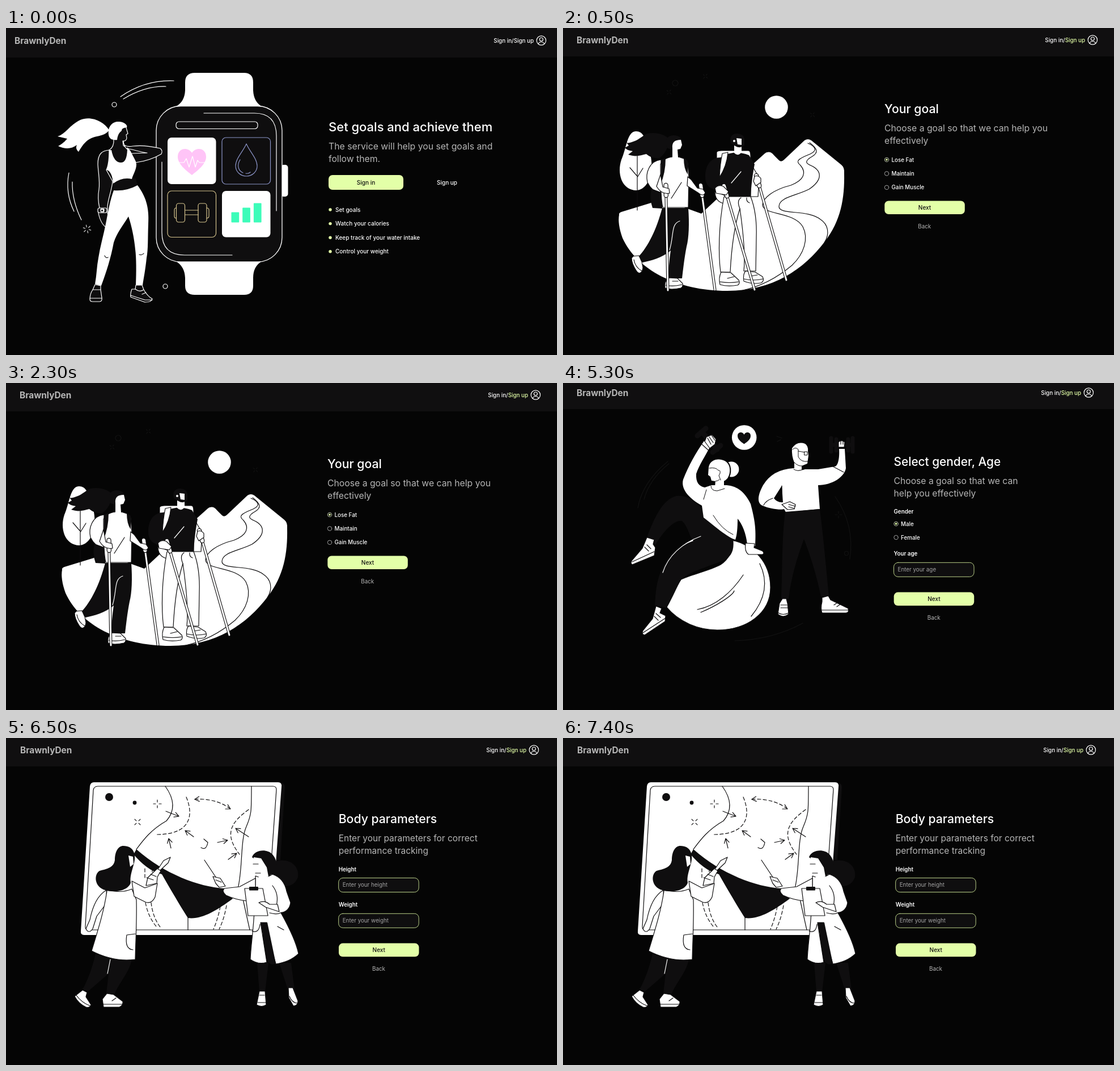
These frames come from a looping animation (972 by 576 pixels, 8000 ms). An HTML page with a canvas:

```html
<!DOCTYPE html>
<html lang="en">
<head>
<meta charset="utf-8">
<title>Health tracker onboarding</title>
<style>
html, body { margin: 0; width: 100%; height: 100%; overflow: hidden; background: #050505; }
canvas { display: block; width: 972px; height: 576px; }
</style>
</head>
<body>
<canvas id="stage" width="972" height="576"></canvas>
<script>
const ctx = document.getElementById('stage').getContext('2d');
const BACK = '#050505', WHITE = '#fff', INK = '#0f0e0f', LIME = '#e3ffa8', GREY = '#b6b6b6', FAINT = '#121212';
const STEPS = [500, 3500, 6500, 8000];

// Shape helpers
function shape(d, fill, stroke, width = 1.2) {
  const path = new Path2D(d);
  if (fill) { ctx.fillStyle = fill; ctx.fill(path); }
  if (stroke) { ctx.strokeStyle = stroke; ctx.lineWidth = width; ctx.stroke(path); }
}
const line = (d, color = INK, width = 1.2) => shape(d, null, color, width);
const outlined = d => shape(d, WHITE, INK);
const hollow = d => shape(d, INK, WHITE);

function paint(fill, stroke, width) {
  if (fill) { ctx.fillStyle = fill; ctx.fill(); }
  if (stroke) { ctx.strokeStyle = stroke; ctx.lineWidth = width; ctx.stroke(); }
}
function circle(x, y, r, fill, stroke, width = 1.2) {
  ctx.beginPath();
  ctx.arc(x, y, r, 0, Math.PI * 2);
  paint(fill, stroke, width);
}
function box(x, y, w, h, r, fill, stroke, width = 1.2) {
  ctx.beginPath();
  ctx.roundRect(x, y, w, h, r);
  paint(fill, stroke, width);
}
function dashed(d) {
  ctx.setLineDash([6, 4]);
  line(d);
  ctx.setLineDash([]);
}
function rays(x, y, inner, outer, count, turn, color) {
  for (let i = 0; i < count; i++) {
    const a = turn + i * Math.PI * 2 / count, c = Math.cos(a), s = Math.sin(a);
    line(`M${x + c * inner} ${y + s * inner}L${x + c * outer} ${y + s * outer}`, color);
  }
}
function arrow(x1, y1, x2, y2, shaft = true) {
  const a = Math.atan2(y2 - y1, x2 - x1);
  const barb = t => `${x2 - 9 * Math.cos(a + t)} ${y2 - 9 * Math.sin(a + t)}`;
  line(`M${barb(.5)}L${x2} ${y2}L${barb(-.5)}` + (shaft ? `M${x1} ${y1}L${x2} ${y2}` : ''));
}
function pole(x1, y1, x2, y2) {
  const d = `M${x1} ${y1}L${x2} ${y2}`, k = 18 / (y2 - y1);
  const grip = `M${x1} ${y1}L${x1 + (x2 - x1) * k} ${y1 + 18}`;
  line(d, INK, 5); line(d, WHITE, 2.8);
  line(grip, INK, 8.4); line(grip, WHITE, 6);
}

// Interface helpers
function text(str, x, y, size = 10, color = WHITE, weight = 500, align = 'left') {
  ctx.font = `${weight} ${size}px Inter, "Open Sans", sans-serif`;
  ctx.textAlign = align;
  ctx.fillStyle = color;
  ctx.fillText(str, x, y);
}
function header(height, x, base, right, accent) {
  ctx.fillStyle = '#100f10';
  ctx.fillRect(0, 0, 972, height);
  text('BrawnlyDen', x, base, 15.4, GREY, 700);
  text('Sign up', right, base - 2, 9.8, accent, 500, 'right');
  text('Sign in/', right - ctx.measureText('Sign up').width, base - 2, 9.8, WHITE, 500, 'right');
  const cx = right + 13.3, cy = base - 6;
  circle(cx, cy, 8.2, null, WHITE, 1.2);
  circle(cx, cy - 2, 3, null, WHITE, 1.2);
  line(`M${cx - 5.3} ${cy + 6}Q${cx - 4} ${cy + 2.5} ${cx} ${cy + 2.5}Q${cx + 4} ${cy + 2.5} ${cx + 5.3} ${cy + 6}`, WHITE);
}
function heading(title, lines, x, base, size, subSize) {
  text(title, x, base, size);
  lines.forEach((s, i) => text(s, x, base + 32.3 + i * 21.5, subSize, GREY, 400));
}
function radio(label, x, y, on) {
  circle(x, y, 3.7, null, on ? '#e6efd2' : '#c4c4c4', .8);
  if (on) circle(x, y, 1.8, LIME);
  text(label, x + 8.5, y + 3.5, 9.8);
}
function button(label, x, y, w, h) {
  box(x, y, w, h, 7, LIME);
  text(label, x + w / 2, y + h / 2 + 3.5, 10, INK, 500, 'center');
}
function nextBack(x, y) {
  button('Next', x, y, 141.5, 23.7);
  text('Back', x + 70.5, y + 48.3, 9.8, GREY, 400, 'center');
}
function field(label, hint, x, y) {
  text(label, x, y - 12, 9.8, WHITE, 600);
  box(x, y, 141.5, 25, 7.5, INK, '#b9cf88', 1);
  text(hint, x + 7, y + 15.4, 9.8, '#a5a5a5', 400);
}

function watch() {
  shape('M316 96Q316 79 333 79H420Q436 79 436 96V110Q437 130 451 138H300Q315 130 316 110Z', WHITE);
  shape('M300 411H451Q436 420 436 440V454Q436 470 420 470H333Q316 470 316 454V440Q315 420 300 411Z', WHITE);
  box(265, 137.5, 222, 274.5, 43, INK, WHITE, 1.3);
  box(487, 241, 10.5, 56, [2, 5, 5, 2], WHITE);
  line('M349 150H438Q477 150 477 190V322M275 236V360Q275 400 315 400H399', WHITE);
  box(300, 165, 144, 12.5, 5, null, WHITE);
  box(285, 193, 85.5, 82, 7, WHITE);
  box(381, 193, 85.5, 82, 7, null, '#8c95c9');
  box(285, 287, 85.5, 81.5, 7, null, '#d6c48e');
  box(381, 287, 85.5, 81.5, 7, WHITE);
  shape('M328 259C318 251 303 240 303 227C303 211 321 209 328 220C335 209 353 211 353 227C353 240 338 251 328 259Z', '#ffc4f7');
  line('M303 237H314L318 230 323 245 329 226 334 245 338 233 341 237H353', WHITE);
  line('M424 204C418 218 405 230 405 243A19 18 0 0 0 443 243C443 230 430 218 424 204ZM413 232C406 243 411 252 418 255M423 256Q428 257 431 254', '#8c95c9');
  for (const x of [300.5, 339]) box(x, 309, 15, 33, 4, null, '#d6c48e');
  line('M316 321H339M316 329H339M300 317Q297 317 297 321V331Q297 335 300 335M354 317Q358 317 358 321V331Q358 335 354 335', '#d6c48e');
  [18, 26, 34].forEach((h, i) => box(397.5 + i * 19.7, 342.5 - h, 13.7, h, 1, '#3dfcb9'));
}

function athlete() {
  line('M202 121Q245 91 296 93M207 125Q245 102 282 103M111 255Q104 290 120 323M117 271Q116 303 133 338', WHITE);
  circle(191, 135, 4, null, WHITE);
  circle(281, 455, 4, null, WHITE);
  rays(143, 354, 3.5, 7, 6, .3, '#ddd');
  shape('M182 180C173 165 150 154 131 162C112 171 105 187 91 191L108 195C101 203 96 206 92 208C105 214 116 213 125 206C122 212 126 216 128 218C136 205 142 196 156 192C167 189 175 189 182 180Z', WHITE);
  hollow('M190 195Q191 210 182 215L188 240H216L219 216 207 207 206 199Q212 200 213 194L212 188 215 186 211 172 195 176Z');
  shape('M181 188C179 172 189 164 200 165C210 166 215 172 213 175C206 176 204 178 204 181C200 184 197 188 196 197C187 198 182 195 181 188Z', WHITE);
  hollow('M207 199C206 207 212 210 224 208C240 206 255 208 272 212Q277 216 274 222C262 229 245 235 229 237L219 217Q208 212 207 199Z');
  line('M212 212C225 214 238 219 249 220L221 221', WHITE);
  shape('M189 274Q205 260 229 265L232 278Q212 289 190 288Z', INK);
  shape('M186 215Q190 237 203 237C212 237 214 224 214 210L219 216C222 224 229 232 230 240C230 250 224 258 222 266Q205 262 189 274C188 256 181 250 177 250C182 240 182 226 182 215Z', WHITE);
  hollow('M182 215C168 216 162 223 162 240C163 258 166 270 164 284Q161 300 165 317L163 326Q167 346 179 353C185 355 187 346 184 338L179 326V315C180 300 187 285 188 270L177 250C182 240 182 226 182 215Z');
  box(162, 317, 16, 8.5, 3, INK, WHITE);
  box(166.5, 318, 7, 6.5, 1.5, WHITE);
  circle(169.5, 321.3, 1.6, INK);
  shape('M190 286Q212 288 232 277C246 296 253 315 251 345C250 370 251 390 248 405C246 425 243 440 241 453H229C230 430 230 405 228 390C226 370 222 350 216 332C205 350 196 360 190 378C185 405 177 430 168 454L157 451C160 435 160 420 163 405C166 385 172 365 176 345C180 325 183 305 190 286Z', WHITE);
  line('M174 401Q176 406 180 404M235 399Q240 401 243 397');
  hollow('M157 452L153 461Q148 468 148 478Q148 482 153 482H165Q170 482 169 475L167 461 167 454Z');
  hollow('M229 453L228 460 222 460Q219 468 220 474L245 483Q257 483 258 477Q250 473 243 461L240 453Z');
  line('M148 476H169M153 461H167M220 471L245 479H258M228 460Q236 466 243 461M240 469L247 466', WHITE);
}

function hikers() {
  circle(376.5, 139.5, 20.3, WHITE);
  circle(198, 97, 5, null, FAINT);
  [[187, 113], [251, 85], [440, 153]].forEach(([x, y]) => rays(x, y, 2, 5, 4, .7, FAINT));
  shape('M99 329Q98 326 103 324L175 302 244 327 275 298 337 238 356 221C362 217 367 218 372 224L381 233Q385 237 390 232L426 198Q432 194 438 198L491 241Q497 246 496 256C497 300 490 340 462 376C425 425 370 463 290 463C200 463 130 425 105 370Q96 345 99 329Z', WHITE);
  line('M432 203C446 209 449 216 436 222C416 230 409 234 419 242C430 255 425 268 402 277C370 285 352 300 352 312C354 330 407 323 423 350C434 371 425 398 404 418C380 438 350 455 317 462');
  line('M435 202C450 213 450 220 440 226C424 235 429 239 439 243C457 252 458 268 434 284C410 296 382 298 381 314C380 330 432 319 454 337C468 346 471 363 461 378');
  shape('M128 182C140 181 145 192 150 212C162 235 158 283 130 286C103 286 95 255 103 232C112 212 113 183 128 182Z', WHITE);
  line('M131 225V321M130 260L118 246M131 263L141 247');
  shape('M188 196C178 186 162 183 149 186C139 190 136 196 124 200C119 202 115 203 112 202L116 207 109 211C113 215 118 216 123 217L115 223C128 228 138 224 147 222C154 228 162 230 170 229C180 222 185 212 188 196Z', INK);
  // Woman
  outlined('M173 232C152 234 145 256 149 272Q157 288 172 292Z');
  shape('M156 283Q152 300 158 317L175 318V290Z', INK);
  outlined('M180 231Q196 223 213 230L220 237 222 262 221 316H176C172 300 172 265 172 240Z');
  shape('M173 232L181 229Q181 255 172 276ZM213 229L220 234V258Q213 248 213 229Z', INK);
  shape('M181 206C180 190 192 187 202 190Q211 194 208 200L195 215 185 212Z', INK);
  shape('M193 212C192 202 196 197 208 197L210 206 207 213 202 214 203 228Q198 232 193 228Z', WHITE);
  line('M191 300L209 272');
  shape('M175 317H221C223 345 222 370 218 385C214 405 212 425 210 441H186C186 425 188 405 190 392C175 405 155 410 140 413L133 403C150 385 165 355 175 317Z', INK);
  line('M188 391C196 365 190 345 206 340', WHITE);
  outlined('M124 402L134 401 139 412 141 422C140 433 133 434 129 427Q121 415 121 405Z');
  outlined('M180 458Q178 446 187 440L202 441 211 450Q212 456 208 458Q190 462 180 458Z');
  line('M125 408Q127 421 139 428M181 453Q194 456 210 452M193 446H203');
  pole(181.5, 277, 185, 462);
  pole(243, 277, 268, 461);
  outlined('M172 258L165 279Q174 294 188 291L187 283 176 280Z');
  outlined('M220 262L219 278 238 290Q248 298 251 290L247 284 237 282 226 267Z');
  // Man
  outlined('M271 230V219Q272 216 280 216H327Q331 216 331 226V238L346 264 344 297H331V230Z');
  shape('M285 224Q305 215 328 224L338 240C334 260 332 280 331 297H285L270 285Q251 282 251 262C251 240 262 228 278 228Z', INK);
  outlined('M281 221L291 219Q289 243 276 263Q277 240 281 221Z');
  shape('M302 203V220Q308 227 315 219V205Z', WHITE);
  shape('M296 203Q292 186 308 186Q319 187 320 195V207Q312 213 304 208Z', INK);
  shape('M306 194L315 195V206L308 205Z', WHITE);
  circle(302, 199, 2, WHITE);
  line('M297 273L314 253', WHITE);
  outlined('M268 288Q268 305 283 309L288 296Z');
  outlined('M284 297H331C340 320 342 345 341 370L340 428H319C322 400 318 360 312 318C302 350 297 390 295 430H278C274 400 274 350 284 297Z');
  line('M312 318Q306 304 314 299M324 299Q323 306 329 308');
  outlined('M277 452Q274 440 279 430L296 431 310 444Q313 450 308 453Q290 456 277 452Z');
  outlined('M319 446Q317 434 322 428L339 430 352 438Q356 446 349 449Q335 452 319 446Z');
  line('M277 447Q294 450 310 447M290 441L302 438M319 442Q336 446 353 442M331 437L343 435');
  pole(284, 278, 338, 461);
  pole(341, 260, 394, 444);
  outlined('M268 282Q274 275 283 279L292 288 288 294 270 291Z');
  outlined('M338 261Q345 259 349 265V272L340 278 336 270Z');
}

function trainers() {
  line('M132 220Q140 175 185 138M143 205Q152 170 187 142M480 200Q515 250 506 310M303 454Q370 452 423 423M377 94L386 97M378 103L384 100', FAINT);
  rays(486, 232, 2, 6, 4, 0, FAINT);
  circle(500, 300, 3.5, null, FAINT);
  circle(319.7, 96, 21.8, WHITE);
  shape('M319.5 107.5C313 103 308 99 308 93C308 86 317 85 319.5 91C322 85 331 86 331 93C331 99 326 103 319.5 107.5Z', INK);
  line('M237 93L252 80M245 86L272 117M264 122L278 110', INK, 9);
  line('M473 97V121M482 99V119M473 109H510M503 99V119M511 97V121', INK, 7);
  // Woman on the ball
  shape('M176 334C185 305 210 282 243 270C215 288 192 310 176 334Z', WHITE);
  outlined('M298 277C335 285 366 315 366 360C366 405 325 435 272 435C240 435 205 422 182 394C195 375 198 350 208 346C225 338 260 330 278 320C290 312 300 300 298 277Z');
  line('M237 399C270 393 298 368 318 338M243 404C270 393 300 374 302 366M347 318Q370 365 332 411');
  shape('M245 222L300 272C302 290 300 300 290 309C270 320 225 330 209 346C200 360 195 375 183 396L162 392C163 370 165 345 176 325C190 300 210 285 230 278C222 270 222 255 210 243C195 240 175 265 163 285L148 272C160 240 175 205 200 199C222 196 240 215 245 222Z', INK);
  line('M176 334C185 305 210 282 243 270', WHITE);
  const head = 'M257 148C260 134 275 132 285 137C297 143 296 160 290 168Q284 175 276 174L269 173 262 172 260 165 256 162Z';
  circle(297, 152, 13.4, WHITE);
  line(head, BACK, 4);
  shape('M249 102L259 113C250 130 240 145 235 160C234 175 240 182 250 184L262 180H285C305 180 320 190 331 213C338 240 341 255 339 287L325 284C323 265 316 248 308 239C308 255 307 268 304 276C290 272 265 250 248 237L245 216C225 205 207 188 212 170C222 145 233 125 249 102Z', WHITE);
  shape('M269 170H284V184Q275 192 268 185Z', WHITE);
  shape(head, WHITE);
  outlined('M250 103L253 95 263 91 270 99 268 108 259 115Z');
  line('M258 95L265 105M262 92L268 101M255 97L261 108M245 108L256 118');
  outlined('M322 282L338 283 337 290 352 296Q356 300 352 302H327Q320 297 322 282Z');
  line('M258 150Q270 148 274 154Q278 153 277 159L275 163 278 171M269 173Q273 173 276 170M261 181Q261 190 272 190L285 186M248 205L253 188M265 233Q280 258 300 267', INK, 1);
  outlined('M148 272L161 276 159 284 163 290 161 304 122 320Q118 317 122 312L140 291Z');
  outlined('M164 393L174 397 171 405 181 410 180 420 144 444Q138 443 141 436L158 415Z');
  line('M122 315L161 297M144 289L151 296M148 285L155 292M141 440L181 414M161 411L168 418M164 406L172 413');
  // Man
  shape('M407 150Q370 152 353 180C342 200 343 212 352 216C365 222 385 224 390 222L394 229Q425 224 453 222L450 180C475 180 497 165 499 150L497 116H487C488 130 486 145 480 147L450 152 427 152Q417 156 407 150Z', WHITE);
  shape('M372 203L386 181 388 210Q378 211 372 203Z', BACK);
  line('M476 147L495 157M370 203Q358 207 354 215M386 181V210');
  outlined('M386 214L400 209 410 214 408 222 396 223Z');
  line('M398 214L410 217M398 218L408 221');
  outlined('M486 113V104Q491 99 497 104L496 113Z');
  line('M490 102V108M494 102V108');
  shape('M404 115Q413 102 427 107Q433 111 432 120L433 128 431 142 421 146V153H408V140Q403 128 404 115Z', WHITE);
  line('M405 117Q410 112 415 117V130Q420 140 432 138M415 120L426 122M426 121H431V127H426ZM408 140Q415 147 421 146M407 152Q415 157 423 152', INK, 1);
  shape('M392 227L453 222C458 260 464 320 469 376H455C448 340 435 300 425 275C412 310 402 345 398 380H385C387 330 386 270 392 227Z', INK);
  outlined('M387 380H394L396 388 398 407Q388 415 379 407L382 388Z');
  outlined('M457 378L468 375 472 382 503 397Q505 405 499 405H457Q454 397 457 385Z');
  line('M380 405Q388 410 398 405M384 391H395M384 396H396M456 400H503M478 391L484 387M483 394L489 390');
}

function doctors() {
  shape('M480 79Q493 78 492 88L484 215H470Z', INK);
  shape('M155 78H480Q487 78 486 86L467 341Q466 347 460 347H138Q131 347 132 340L148 85Q149 78 155 78Z', WHITE);
  line('M162 85H471Q477 85 477 91L460 330Q459 338 452 338H146Q139 338 140 331L154 92Q155 85 162 85Z');
  circle(182, 104, 7, INK);
  circle(227, 114, 3.4, INK);
  rays(267, 116, 3, 7, 4, 0, INK);
  rays(232, 148, 3, 7, 4, Math.PI / 4, INK);
  shape('M230 196L225 205C240 222 255 235 275 240C295 275 310 300 321 317C345 320 370 305 400 283L385 265C340 262 280 240 230 196Z', INK);
  line('M281 85C299 110 297 130 283 146C255 162 242 180 230 196M433 85C433 130 433 135 424 156C413 180 418 230 409 265M321 316V338M350 215L372 248M344 193Q353 199 356 184L349 178M416 275L430 338');
  dashed('M318 104C333 140 322 170 266 170');
  dashed('M428 126C395 150 385 170 412 205');
  dashed('M333 108C360 106 382 114 396 125');
  dashed('M246 290Q251 316 266 333M256 290Q259 316 272 333M245 230V248M258 230V245');
  dashed('M389 295Q385 318 376 337M378 297Q374 318 366 337');
  arrow(345, 107, 333, 108, false);
  arrow(385, 119, 396, 125, false);
  arrow(282, 129, 305, 138);
  arrow(331, 174, 316, 163);
  arrow(291, 194, 287, 177);
  arrow(373, 184, 391, 180);
  arrow(428, 174, 405, 159);
  arrow(392, 214, 407, 203);
  // Left figure
  shape('M158 380Q190 393 222 388C220 410 200 430 192 450H177L181 415 145 446 135 443C145 425 152 405 158 380Z', INK);
  line('M184 390L179 415', WHITE);
  outlined('M177 268C160 278 152 300 148 320L141 336Q146 346 153 336L160 314 178 290Z');
  outlined('M178 266Q200 275 222 266L230 285C231 320 229 350 228 390Q190 395 151 375C160 345 172 310 178 270Z');
  outlined('M222 252L245 264 262 258 267 256 263 280Q257 293 246 289L226 279Z');
  outlined('M247 260L250 246 268 229 273 234 267 245 266 256Z');
  outlined('M268 231L278 216 290 210 286 220 272 233Z');
  line('M248 246L260 250M255 240L265 244M228 345L213 347Q209 372 224 373');
  shape('M207 190C225 190 230 205 226 220C222 235 218 245 220 255C215 270 190 273 175 268C155 262 155 240 165 234C180 230 190 228 192 215C192 200 198 190 207 190Z', INK);
  shape('M216 207L224 209 225 222 219 227Z', WHITE);
  outlined('M121 455L135 444 143 448 141 456 150 470Q148 476 141 474Q128 468 121 455Z');
  outlined('M170 460L178 450 190 452 206 464Q207 471 200 474H172Z');
  line('M123 452Q134 467 149 472M171 469H206M187 463L194 458');
  // Right figure
  shape('M468 220C495 208 518 222 515 245C508 266 480 267 468 245Z', INK);
  shape('M443 396H463L457 448H447ZM482 396H503L509 444 498 446Z', INK);
  outlined('M440 243Q455 250 470 240C485 245 492 255 495 270L502 290Q500 305 485 308C500 335 512 360 516 380Q500 395 476 398L461 345 460 325H449L460 395Q445 400 431 390C432 360 440 320 440 250Z');
  shape('M449 325H461L476 397Q468 402 461 393Z', INK);
  outlined('M440 247L412 262 385 265Q380 270 388 277Q405 285 425 287L440 275Z');
  outlined('M365 244L378 247 387 261 376 263 370 256Z');
  line('M370 250L380 254M470 260Q482 275 477 295M465 308Q478 312 487 307M434 340Q446 345 448 328M479 332L490 338');
  outlined('M421 265H453L462 313H427Z');
  box(429, 262, 16, 6.5, 1, INK);
  outlined('M446 290Q456 285 465 293L479 293 482 306 458 298Z');
  shape('M434 210C438 197 460 194 470 205C479 215 480 230 470 238L462 245 450 222Z', INK);
  shape('M437 210L435 228 440 238 447 240 445 247Q454 253 463 244L460 228 450 212Z', WHITE);
  line('M436 222H445M440 238L449 238');
  outlined('M447 446H457L459 470Q451 475 442 470Z');
  outlined('M498 440L506 440 515 463Q515 472 507 472L499 458Z');
  line('M444 466H459M447 453H456M500 455Q505 467 514 467');
}

const scenes = [
  () => {
    header(52, 15, 28, 931, WHITE);
    watch();
    athlete();
    heading('Set goals and achieve them', ['The service will help you set goals and', 'follow them.'], 569, 182, 22, 15.8);
    button('Sign in', 569, 259, 132, 26);
    text('Sign up', 778, 275.7, 10, WHITE, 500, 'center');
    ['Set goals', 'Watch your calories', 'Keep track of your water intake', 'Control your weight'].forEach((s, i) => {
      circle(572, 320 + i * 24.6, 2.7, LIME);
      text(s, 581, 323.5 + i * 24.6);
    });
  },
  () => {
    header(50, 24, 27, 921, LIME);
    hikers();
    heading('Your goal', ['Choose a goal so that we can help you', 'effectively'], 567, 150, 21.2, 15.75);
    ['Lose Fat', 'Maintain', 'Gain Muscle'].forEach((s, i) => radio(s, 571, 232 + i * 24.4, !i));
    nextBack(567.3, 304.4);
  },
  () => {
    header(46, 24, 23, 914, LIME);
    trainers();
    heading('Select gender, Age', ['Choose a goal so that we can', 'help you effectively'], 583.5, 146, 20.8, 15.7);
    text('Gender', 583.5, 230, 9.8, WHITE, 600);
    radio('Male', 587.5, 248, true);
    radio('Female', 587.5, 272, false);
    field('Your age', 'Enter your age', 583.5, 316.3);
    nextBack(583.7, 368.6);
  },
  () => {
    header(50, 25, 27, 918, LIME);
    doctors();
    heading('Body parameters', ['Enter your parameters for correct', 'performance tracking'], 586.7, 150, 21.2, 15.5);
    field('Height', 'Enter your height', 586.7, 246.5);
    field('Weight', 'Enter your weight', 586.7, 309.3);
    nextBack(587, 361.6);
  }
];

ctx.lineJoin = ctx.lineCap = 'round';
const start = performance.now();
let shown = -1;
function frame() {
  const t = (performance.now() - start) % 8000;
  const index = STEPS.findIndex(end => t < end);
  if (index !== shown) {
    shown = index;
    ctx.fillStyle = BACK;
    ctx.fillRect(0, 0, 972, 576);
    scenes[index]();
  }
  requestAnimationFrame(frame);
}
frame();
</script>
</body>
</html>
```
